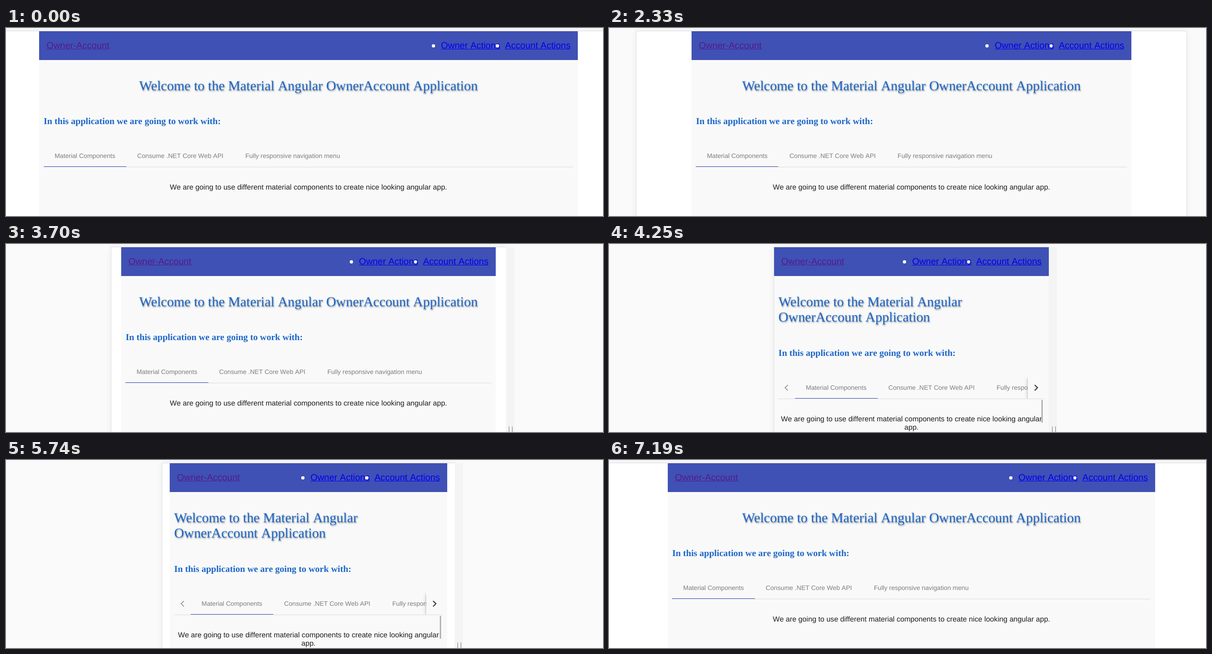
Animation, 1280 px wide and 405 px high, one loop 8.05 s. Source, as an HTML page:

```html
<!DOCTYPE html>
<html lang="en">
<head>
<meta charset="utf-8">
<title>Owner-Account</title>
<style>
* { box-sizing: border-box; margin: 0; padding: 0; }
html, body { width: 100%; height: 100%; overflow: hidden; background: #fafafa; }
body {
  position: relative; font-family: "Liberation Sans", Arial, sans-serif;
  text-rendering: geometricPrecision; font-kerning: none;
}
#page {
  position: absolute; top: 7px; height: 440px; background: #fff;
  box-shadow: 0 0 0 1px #e0e0e0, 0 0 14px rgba(0, 0, 0, .07);
}
#app { position: absolute; top: 0; height: 440px; background: #f9f9f9; }
nav {
  display: flex; justify-content: space-between; height: 62.2px; line-height: 62.6px;
  padding: 0 15.8px; background: #3f51b5; font-size: 19.58px; white-space: nowrap;
}
.small nav { height: 54.4px; line-height: 54.8px; }
nav a { color: #00e; text-decoration: underline; }
nav .seen { color: #551a8b; }
nav ul { display: flex; gap: 10px; list-style: none; }
nav li { position: relative; }
nav li::before {
  content: ""; position: absolute; left: -19.6px; top: calc(50% - 2.6px);
  width: 6.6px; height: 6.6px; border-radius: 50%; background: #fff;
}
main { padding: 0 9.8px; }
h1, h2 { font-family: "Liberation Serif", "Times New Roman", serif; color: #1b66c9; }
h1 {
  display: flex; justify-content: center; padding-top: 39.5px;
  font-size: 29.34px; font-weight: 400; line-height: 33.4px;
  text-shadow: 1px 2px 3px rgba(128, 128, 128, .85);
}
h1 span::first-letter { letter-spacing: -.08em; }
h2 { margin-top: 49.3px; font-size: 19.54px; line-height: 22.5px; white-space: nowrap; }
.tabs {
  display: flex; height: 47.9px; margin-top: 38.4px; overflow: hidden;
  border-bottom: 1px solid #dcdcdc;
}
.list { display: flex; flex: 1; min-width: 0; overflow: hidden; }
.list span {
  flex: none; padding: 0 23.5px; font-size: 13.7px; line-height: 48.4px;
  color: #7d7d7d; white-space: nowrap;
}
.tabs, .list span { position: relative; }
.tabs { overflow: clip; overflow-clip-margin: 0px; }
.list { margin-bottom: -1px; }
.list span:first-child::after {
  content: ""; position: absolute; left: 0; right: 0; bottom: 0; height: 2px; background: #3f51b5;
}
.tabs svg { display: none; flex: none; width: 35.2px; height: 47px; fill: none; stroke-width: 2; }
.paged svg { display: block; }
.prev { stroke: #9b9b9b; }
.next {
  stroke: #212121;
  box-shadow: 0 2px 4px -1px rgba(0, 0, 0, .2), 0 4px 5px rgba(0, 0, 0, .14), 0 1px 10px rgba(0, 0, 0, .12);
}
.body { position: relative; padding-top: 35px; }
.body p { font-size: 15.66px; line-height: 18px; text-align: center; color: #1e1e1e; }
#thumb { position: absolute; right: 3.2px; top: 2.6px; width: 3px; height: 49px; background: #b3b3b3; }
#grip { position: absolute; left: 100%; top: 0; width: 18px; height: 440px; background: #f4f4f4; }
#grip::before {
  content: ""; position: absolute; left: 6.5px; top: 386px; width: 6px; height: 14px;
  border: solid #757575; border-width: 0 1.5px;
}
#spot {
  position: absolute; left: 1184px; top: 400px; width: 26px; height: 26px;
  border-radius: 50%; background: rgba(255, 250, 90, .8);
}
</style>
</head>
<body>
<div id="page">
  <div id="app">
    <nav>
      <a class="seen">Owner-Account</a>
      <ul><li><a>Owner Actions</a></li><li><a>Account Actions</a></li></ul>
    </nav>
    <main>
      <h1><span>Welcome to the Material Angular OwnerAccount Application</span></h1>
      <h2>In this application we are going to work with:</h2>
      <div class="tabs">
        <svg class="prev"><path d="M20.5 17.6l-6 6 6 6"/></svg>
        <div class="list">
          <span>Material Components</span><span>Consume .NET Core Web API</span><span>Fully responsive navigation menu</span>
        </div>
        <svg class="next"><path d="M14.7 17.6l6 6-6 6"/></svg>
      </div>
      <div class="body">
        <p>We are going to use different material components to create nice looking angular app.</p>
        <div id="thumb"></div>
      </div>
    </main>
  </div>
  <div id="grip"></div>
</div>
<div id="spot"></div>
<script>
const LOOP = 8050, CENTER = 648.5, FULL = 1444, STEP = 78;
const [page, app, thumb, grip, spot] =
  ['page', 'app', 'thumb', 'grip', 'spot'].map(id => document.getElementById(id));

// Each drag of the page edge; power shapes an ease-out
const drags = [
  { start: 1540, end: 1620, steps: 2, from: 1381, to: 1340 },
  { start: 1920, end: 2710, steps: 10, from: 1322, to: 1002 },
  { start: 2790, end: 3170, steps: 6, from: 984, to: 860 },
  { start: 3700, end: 4490, steps: 11, from: 846, to: 554, power: 1.74 },
  { start: 4560, end: 4560, steps: 1, from: 546, to: 546 },
  { start: 5560, end: 6350, steps: 11, from: 552, to: 985, power: .85 },
  { start: 6430, end: 6970, steps: 8, from: 1026, to: 1300, power: .86 },
  { start: 7190, end: 7190, steps: 1, from: 1307, to: 1307 }
];

function widthAt(t) {
  const drag = drags.findLast(d => t >= d.start);
  if (!drag) return FULL;
  const { start, end, steps, from, to, power = 1 } = drag;
  if (t >= end) return to;
  const n = steps - 1;
  const k = Math.floor((t - start + 8) / (end - start) * n) / n;
  return from + (to - from) * (1 - (1 - k) ** power);
}

// The scrollbar fades in two steps once the page rests
function thumbAlpha(t) {
  if (t < 4880 || t >= 5560) return 1;
  return t < 4960 ? .6 : t < 5110 ? .3 : 0;
}

function draw(t) {
  const w = widthAt(t);
  // While growing fast, the layout trails the frame by one step
  const inner = t >= 6500 && t < 6960 ? widthAt(t - STEP) : w;
  const share = inner < 591.5 ? 1 : inner < 945 ? .95 : .8;
  const content = inner * share;
  page.style.left = CENTER - w / 2 + 'px';
  page.style.width = w + 'px';
  app.style.left = (inner - content) / 2 + 'px';
  app.style.width = content + 'px';
  app.classList.toggle('small', inner < 588);
  app.classList.toggle('paged', content < 680);
  thumb.style.opacity = content < 614 ? thumbAlpha(t) : 0;
  grip.style.display = t >= 2860 ? 'block' : 'none';
  spot.style.display = t >= 6500 && t < 6580 ? 'block' : 'none';
}

const start = performance.now();
function tick() {
  draw((performance.now() - start) % LOOP);
  requestAnimationFrame(tick);
}
tick();
</script>
</body>
</html>
```
